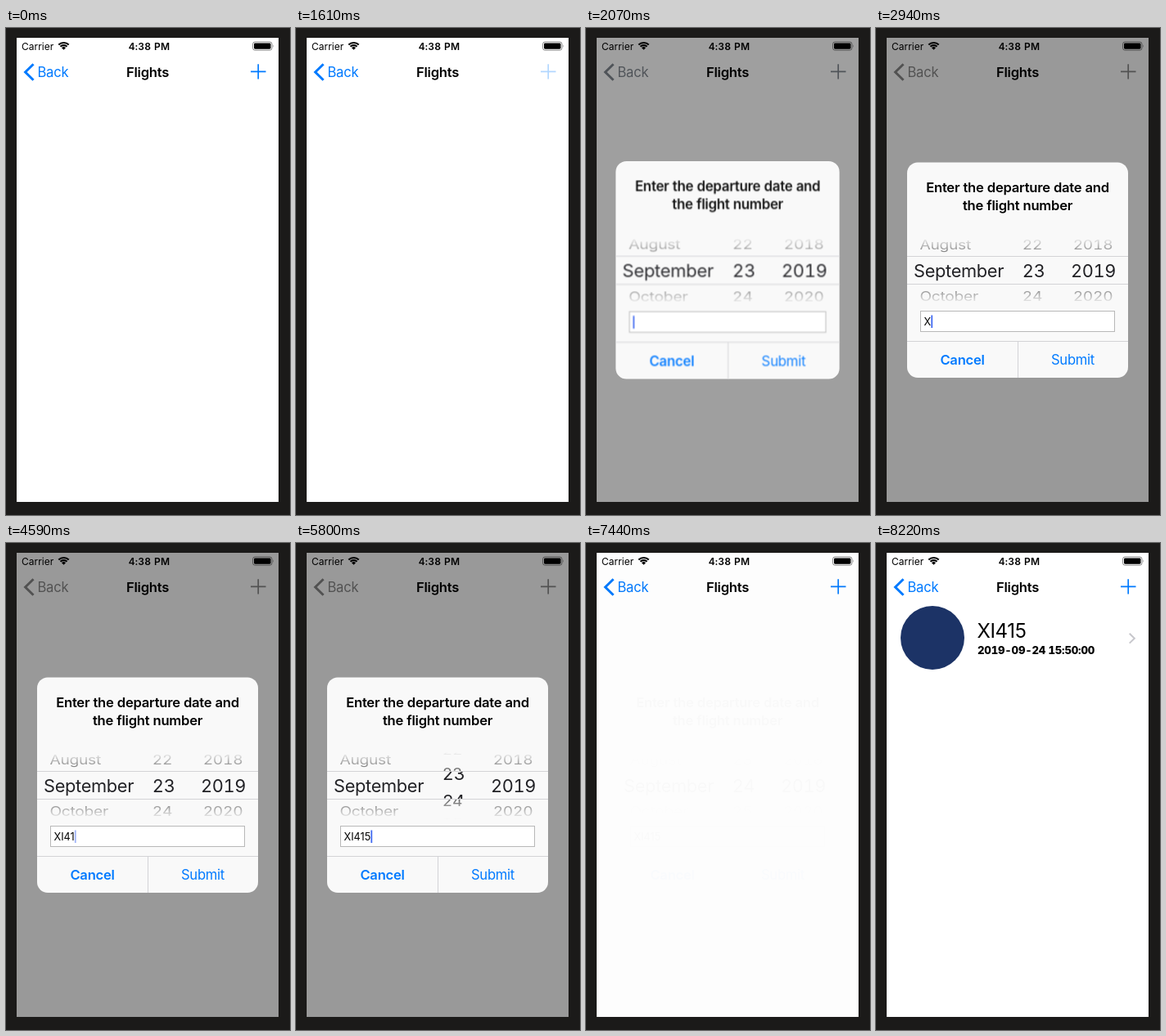
An HTML page for the animation above (9630 ms loop, 347 by 596 pixels).

```html
<!DOCTYPE html>
<html lang="en">
<head>
<meta charset="utf-8">
<title>Flights</title>
<style>
  html, body { margin: 0; width: 100%; height: 100%; overflow: hidden; background: #1b1a19; }
  svg { display: block; width: 100vw; height: 100vh; }
  text { font: 400 16.6px Inter, sans-serif; letter-spacing: -.015em; font-variant-numeric: tabular-nums; }
  .mid { text-anchor: middle; }
  text.bold { font-weight: 600; }
  text.status { font-size: 12px; letter-spacing: 0; }
  text.clock { letter-spacing: .3px; }
  text.outer { font-size: 19.2px; }
  text.inner { font-size: 21.8px; fill: #222226; }
  text.field { font-size: 12.7px; font-variant-numeric: normal; letter-spacing: 0; }
  text.flight { font-size: 24px; font-variant-numeric: normal; }
  text.date { font-size: 13.2px; font-weight: 800; }
  .line { fill: none; stroke: currentColor; }
</style>
</head>
<body>
<svg viewBox="0 0 347 596">
  <defs>
    <linearGradient id="fade" gradientUnits="userSpaceOnUse" x1="0" y1="256" x2="0" y2="338">
      <stop offset="0" stop-color="#fff" stop-opacity="0"/>
      <stop offset=".287" stop-color="#fff" stop-opacity=".6"/>
      <stop offset=".287" stop-color="#fff" stop-opacity="0"/>
      <stop offset=".701" stop-color="#fff" stop-opacity="0"/>
      <stop offset=".701" stop-color="#fff" stop-opacity=".6"/>
      <stop offset="1" stop-color="#fff" stop-opacity="0"/>
    </linearGradient>
    <mask id="outside" maskUnits="userSpaceOnUse" x="38" y="256" width="270" height="82">
      <rect x="38" y="256" width="270" height="82" fill="url(#fade)"/>
    </mask>
    <clipPath id="band"><rect x="38" y="279.5" width="270" height="34"/></clipPath>
    <clipPath id="rounded"><rect x="38" y="164.5" width="270" height="263.5" rx="13"/></clipPath>
  </defs>

  <rect x="13" y="12" width="320" height="568" fill="#fff"/>

  <text class="status" x="19" y="26.5">Carrier</text>
  <g transform="translate(70.5 26.8)" fill="none" stroke="#000" stroke-width="2.1">
    <path d="M0 0L-2.5 -2.5A3.5 3.5 0 0 1 2.5 -2.5Z" fill="#000" stroke="none"/>
    <path d="M-4 -4A5.6 5.6 0 0 1 4 -4M-6.2 -6.2A8.8 8.8 0 0 1 6.2 -6.2"/>
  </g>
  <text class="status clock bold mid" x="175" y="26.5">4:38 PM</text>
  <rect x="301.5" y="17" width="23.5" height="10.2" rx="2.8" fill="none" stroke="#000" stroke-opacity=".45"/>
  <rect x="303" y="18.5" width="20.5" height="7.2" rx="1.4"/>
  <path d="M326.3 20.3q1.4 1.8 0 3.6z" fill-opacity=".5"/>

  <text class="bold mid" x="173" y="60">Flights</text>
  <g id="nav">
    <path class="line" d="M33.5 44.3L23.6 54L33.5 63.7" stroke-width="3"/>
    <text x="38.5" y="60" fill="currentColor">Back</text>
    <path id="plus" class="line" d="M299 53.3H317.5M308.2 44.2V62.5" stroke-width="1.7"/>
  </g>

  <g id="row">
    <circle cx="69" cy="116" r="39" fill="#1c3366"/>
    <text class="flight" x="123.5" y="115.5">XI415</text>
    <text class="date" x="124" y="136">2019-09-24 15:50:00</text>
    <path d="M309.7 110.8L315.8 116.7L309.7 122.6" fill="none" stroke="#c7c7cc" stroke-width="2"/>
  </g>

  <rect id="dim" x="13" y="12" width="320" height="568"/>

  <g id="alert">
    <rect id="panel" x="38" y="164.5" width="270" height="263.5" rx="13" fill="#f9f9f9"/>
    <g id="content">
      <g clip-path="url(#rounded)">
        <rect id="press" x="174" y="384" width="134" height="44" fill="#e6e6e6"/>
      </g>
      <text class="bold mid" x="173" y="200.5">Enter the departure date and</text>
      <text class="bold mid" x="173" y="222.5">the flight number</text>
      <g id="outerRows" mask="url(#outside)"></g>
      <g id="innerRows" clip-path="url(#band)"></g>
      <path d="M38 279.5H308M38 313.5H308M38 383.5H308M173.5 384V428" stroke="#d3d3d6"/>
      <rect x="54.5" y="346.5" width="237" height="25" fill="#fff" stroke="#b8b8b8"/>
      <text id="entry" class="field" x="58.5" y="363.5"></text>
      <rect id="caret" y="351.5" width="1.8" height="15.5" fill="#426bf2"/>
      <text class="bold mid" x="105.5" y="412" fill="#007aff">Cancel</text>
      <text class="mid" x="240.5" y="412" fill="#007aff">Submit</text>
    </g>
  </g>
</svg>
<script>
const LOOP = 9630;
const FLIGHT = "XI415";
const ROW_ANGLE = 0.65, WHEEL_RADIUS = 52, WHEEL_Y = 297;

// Screen refreshes: [first, last, count]
const BURSTS = [[1610, 2510, 9], [5580, 6020, 5], [6240, 6780, 6], [7100, 7560, 5], [7880, 8220, 4]];
const TYPED = [[0, 0], [2940, 1], [3600, 2], [3920, 3], [4040, 4], [4810, 5]];
const CARET = [[0, 1], [2510, .5], [2610, 0], [2840, 1], [4590, .5], [4700, 0], [4810, 1],
               [5120, .5], [5240, 1], [6670, .5], [6780, 0]];

const el = id => document.getElementById(id);
const clamp = x => Math.min(1, Math.max(0, x));
const smooth = x => (x = clamp(x), x * x * (3 - 2 * x));
const valueAt = (keys, t) => keys.findLast(([start]) => start <= t)[1];

// Critically damped spring, ms since start
const spring = ms => {
  const x = Math.max(0, ms) * 0.0228;
  return 1 - (1 + x) * Math.exp(-x);
};

function snap(t) {
  for (const [first, last, count] of BURSTS) {
    if (t < first || t >= last) continue;
    const step = (last - first) / (count - 1);
    const tick = n => Math.floor((first + n * step) / 10) * 10;
    let n = Math.floor((t - first) / step);
    if (tick(n + 1) <= t) n++;
    return tick(n);
  }
  return t;
}

function makeText(parent, className, label, x) {
  const node = document.createElementNS("http://www.w3.org/2000/svg", "text");
  node.setAttribute("class", className);
  node.setAttribute("x", x);
  node.textContent = label;
  parent.append(node);
  return node;
}

function makeWheel(labels, outerX, innerX, align) {
  const rows = labels.map(label => [
    [makeText(el("outerRows"), "outer " + align, label, outerX), 6.9],
    [makeText(el("innerRows"), "inner " + align, label, innerX), 7.9]
  ]);
  return position => rows.forEach((pair, i) => {
    const angle = (i - 1 - position) * ROW_ANGLE;
    const y = WHEEL_Y + WHEEL_RADIUS * Math.sin(angle);
    for (const [node, baseline] of pair) {
      node.setAttribute("y", baseline);
      node.setAttribute("transform", `translate(0 ${y}) scale(1 ${Math.cos(angle)})`);
    }
  });
}

makeWheel(["August", "September", "October"], 53.5, 46, "")(0);
makeWheel(["2018", "2019", "2020"], 265, 265.5, "mid")(0);
const turnDays = makeWheel(["22", "23", "24", "25"], 191, 192.5, "mid");

function draw(time) {
  const t = snap(time);
  const opened = spring(t - 1863);
  const shown = t < 7560 ? opened * (1 - spring(t - 7180)) : 0;

  const tint = [0, 122, 255].map(c => Math.round(c + (136 - c) * shown));
  el("nav").style.color = `rgb(${tint})`;
  el("plus").style.opacity = t < 1610 ? 1 : 0.3 + 0.7 * smooth((t - 1830) / 230);

  el("dim").style.opacity = 0.4 * shown;
  const scale = 1 + 0.2 * (1 - opened);
  el("alert").setAttribute("transform", `translate(173 296.2) scale(${scale}) translate(-173 -296.2)`);
  el("alert").style.display = shown > 0 ? "" : "none";
  el("panel").style.opacity = clamp(1.5 * shown);
  el("content").style.opacity = shown;
  el("press").style.opacity = t >= 7100 && t < 7210 ? 1 : 0;

  turnDays(0.7 * smooth((t - 5500) / 520) + 0.3 * smooth((t - 6150) / 450));

  const entry = el("entry");
  entry.textContent = FLIGHT.slice(0, valueAt(TYPED, t));
  el("caret").setAttribute("x", 58.7 + entry.getComputedTextLength());
  el("caret").style.opacity = valueAt(CARET, t);

  el("row").style.opacity = smooth((t - 7780) / 440);
}

function frame() {
  draw(performance.now() % LOOP);
  requestAnimationFrame(frame);
}
frame();
</script>
</body>
</html>
```
